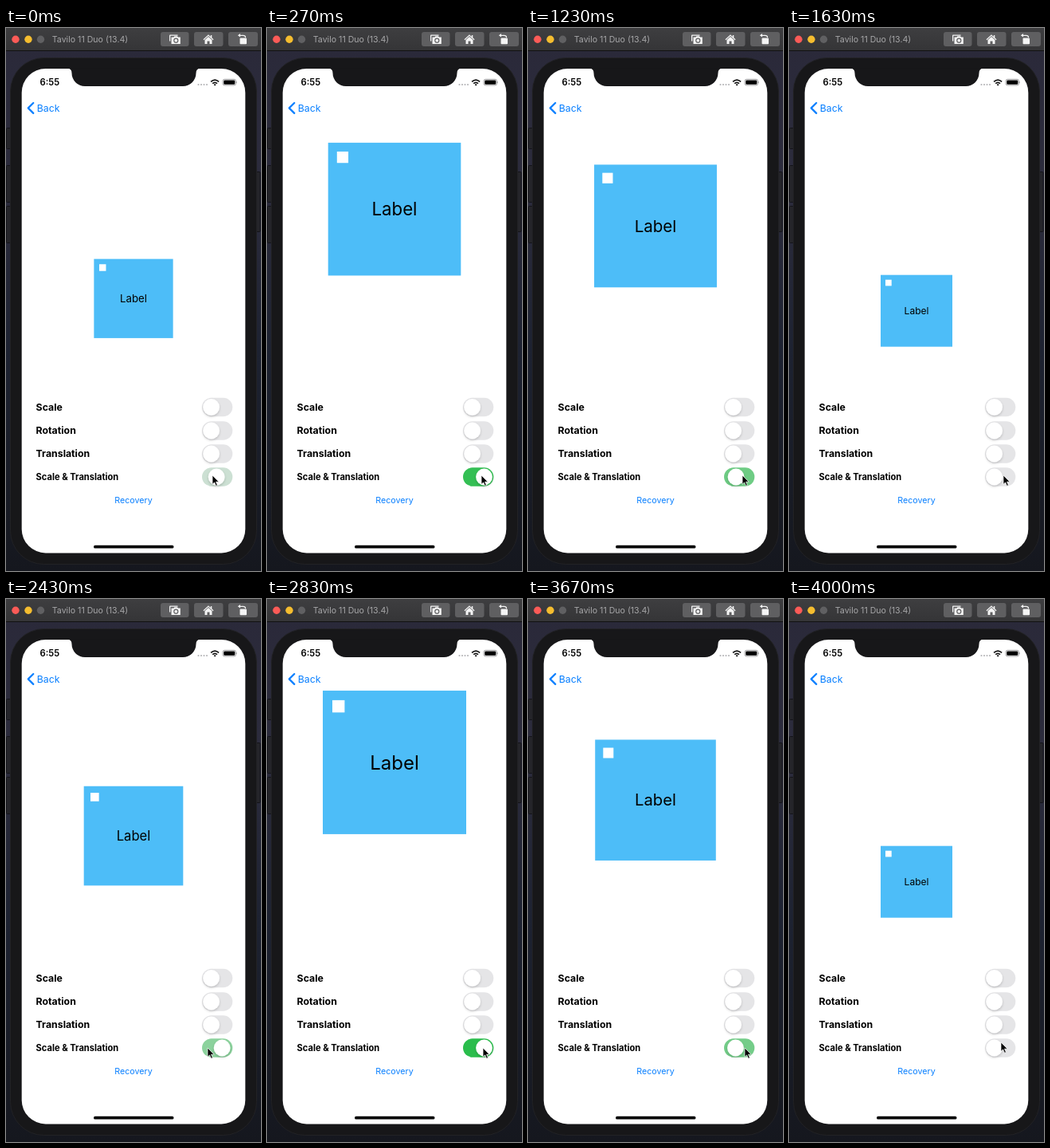
Animation, 320 px wide and 681 px high, one loop 4.03 s. Source, as an HTML page:

```html
<!DOCTYPE html>
<html lang="en">
<head>
<meta charset="utf-8">
<title>Transform demo</title>
<style>
  html, body { margin: 0; width: 100%; height: 100%; overflow: hidden; background: #15171f; }
  svg { display: block; width: 320px; height: 681px; font-family: Inter, Roboto, sans-serif; }
  .bold { font-weight: 700; font-size: 12.3px; }
  .mid { text-anchor: middle; }
  .blue { fill: #087fff; }
  .line { fill: none; stroke-linecap: round; stroke-linejoin: round; }
</style>
</head>
<body>
<svg viewBox="0 0 320 681">
  <defs>
    <linearGradient id="desk" x2="0" y2="1">
      <stop stop-color="#2a2939"/>
      <stop offset=".3" stop-color="#2c2c3d"/>
      <stop offset=".6" stop-color="#1d2231"/>
      <stop offset="1" stop-color="#15171e"/>
    </linearGradient>
    <linearGradient id="bar" x2="0" y2="1">
      <stop stop-color="#3e3e40"/>
      <stop offset="1" stop-color="#353537"/>
    </linearGradient>
    <filter id="shade" x="-50%" y="-50%" width="200%" height="200%">
      <feDropShadow dx="0" dy="1.5" stdDeviation="1.4" flood-opacity=".2"/>
    </filter>
  </defs>
  <rect width="320" height="681" fill="url(#desk)"/>

  <!-- window bar -->
  <rect width="320" height="28" fill="url(#bar)"/>
  <rect y="28" width="320" height="1" fill="#111"/>
  <circle cx="12" cy="14.3" r="4.7" fill="#fc5b57"/>
  <circle cx="28" cy="14.3" r="4.7" fill="#f5bd2f"/>
  <circle cx="43.5" cy="14.3" r="4.7" fill="#606062"/>
  <text x="57.800" y="18" font-size="10.600" fill="#a6a6a8">Tavilo 11 Duo (13.4)</text>
  <g fill="#5f5f61">
    <rect x="194" y="5" width="35.5" height="18" rx="3"/>
    <rect x="236" y="5" width="36.5" height="18" rx="3"/>
    <rect x="279" y="5" width="37" height="18" rx="3"/>
  </g>
  <g fill="#f4f4f4">
    <path d="M205 16.5V9.5q0-1 1-1h9.500v1.300h-9.200v6.700z"/>
    <path d="M207.500 11.500h2.900l1-1.300h3.600l1 1.300h2.800v8.500H207.500z"/>
    <path d="M247.500 14.300 254 8.300l2.800 2.600V9h1.500v3.300l2.200 2-.8.900-5.700-5.200-5.700 5.200z"/>
    <path d="M249.500 15 254 11l4.500 4v5h-3v-3.500h-3V20h-3z"/>
    <rect x="293.500" y="12.500" width="8.500" height="7.800" rx="1"/>
    <path d="M294 7v4.600l-3.200-2.300z"/>
  </g>
  <path class="line" d="M294 9.300h3.500q3 0 3 2.200" stroke="#f4f4f4" stroke-width="1.200"/>
  <circle cx="213.300" cy="15.700" r="2.500" fill="none" stroke="#5f5f61" stroke-width="1.200"/>

  <!-- phone -->
  <g fill="#25252a" stroke="#14141a">
    <rect x=".5" y="125.500" width="7" height="26" rx="1"/>
    <rect x=".5" y="172.500" width="7" height="46" rx="1"/>
    <rect x=".5" y="223.500" width="7" height="46" rx="1"/>
    <rect x="313" y="180.500" width="6" height="75" rx="1"/>
  </g>
  <rect x="5.500" y="37.500" width="309" height="635" rx="42" fill="#171719" stroke="#222225"/>
  <rect x="19.700" y="51" width="280.600" height="607.400" rx="30" fill="#fff"/>
  <path d="M77 50.500q5.500.500 5.500 6a16.500 16.500 0 0 0 16.500 16.500h123a16.500 16.500 0 0 0 16.500-16.500q0-5.500 5.500-6z" fill="#171719"/>

  <!-- status bar -->
  <text class="bold" x="42.500" y="72.300" style="font-size:11.3px;font-weight:600">6:55</text>
  <g fill="#b5b5b7">
    <circle cx="241.500" cy="71" r="1.100"/><circle cx="245" cy="71" r="1.100"/>
    <circle cx="248.500" cy="71" r="1.100"/><circle cx="252" cy="71" r="1.100"/>
  </g>
  <g class="line" stroke="#111" stroke-width="1.700" style="stroke-linecap:butt">
    <path d="M257.100 67.400q5-4.600 10 0M259.200 69.600q2.900-2.600 5.800 0"/>
  </g>
  <path d="M260.600 71q1.500-1.300 3 0l-1.500 1.600z"/>
  <rect x="272" y="64.300" width="16.500" height="7.600" rx="2.300" fill="none" stroke="#8b8b8d" stroke-width=".8"/>
  <rect x="273.200" y="65.500" width="14.100" height="5.200" rx="1.300"/>
  <path d="M289.300 66.800q1.500 1.300 0 2.600z" fill="#8b8b8d"/>

  <!-- screen content -->
  <path class="line" d="M34.300 94 27.800 100.400l6.500 6.500" stroke="#087fff" stroke-width="2.200"/>
  <text class="blue" x="38.800" y="104.900" font-size="12.300">Back</text>
  <g id="box">
    <rect x="-45" y="-45" width="90" height="90" fill="#4dbdf8"/>
    <rect x="-39" y="-39" width="7.700" height="7.700" fill="#fff"/>
    <text class="mid" y="4.300" font-size="12">Label</text>
  </g>
  <g id="rows"></g>
  <text class="blue mid" x="160" y="596" font-size="10.700">Recovery</text>
  <rect x="110" y="648.800" width="100.500" height="3.700" rx="1.850"/>
  <path id="cursor" d="M0 0V11.300l2.600-2.400 1.900 4.300 1.900-.8-1.900-4.200h3.600z"
    stroke="#fff" stroke-width=".7" stroke-linejoin="round"/>
</svg>
<script>
const $ = id => document.getElementById(id);
const LOOP = 4030, OFF = [229, 229, 231], ON = [42, 189, 76];

const rows = [['Scale', 475.5], ['Rotation', 505], ['Translation', 534], ['Scale &amp; Translation', 563, 11.1]];
$('rows').innerHTML = rows.map(([name, y, size = 12.3]) => `
  <text class="bold" x="37.600" y="${y + size * .36}" style="font-size:${size}px">${name}</text>
  <rect class="track" x="246" y="${y - 11.7}" width="38.300" height="23.400" rx="11.700" fill="rgb(${OFF})"/>
  <circle class="knob" cx="257.600" cy="${y}" r="10.400" fill="#fff" filter="url(#shade)"/>`).join('');
const track = [...document.querySelectorAll('.track')].pop();
const knob = [...document.querySelectorAll('.knob')].pop();

// [start time, switch state]
const flips = [[-103, 1], [1050, 0], [2218, 1], [3481, 0]];
// [time, x, y] of the pointer tip
const path = [[0, 259, 561], [250, 269, 561], [1650, 269, 561], [2150, 253, 563],
  [2430, 253, 563], [2700, 271, 563], [3670, 272, 563], [4000, 266, 556], [LOOP, 266, 556]];

const ease = x => (1 - Math.cos(Math.PI * x)) / 2;
const mix = (a, b, k) => a + (b - a) * k;

function draw(t) {
  const [start, on] = flips.findLast(f => f[0] <= t);
  const phase = ms => {
    const x = Math.min(1, (t - start) / ms);
    return on ? x : 1 - x;
  };
  const p = ease(phase(500)), tint = ease(phase(440));
  $('box').setAttribute('transform', `translate(160 ${mix(354.7, 204.9, p)}) scale(${1 + p})`);
  track.setAttribute('fill', `rgb(${OFF.map((c, i) => Math.round(mix(c, ON[i], tint)))})`);
  knob.setAttribute('cx', mix(257.6, 272.5, phase(235)));

  const i = path.findIndex(q => q[0] > t), a = path[i - 1], b = path[i];
  const k = ease((t - a[0]) / (b[0] - a[0]));
  $('cursor').setAttribute('transform', `translate(${mix(a[1], b[1], k)} ${mix(a[2], b[2], k)})`);
}

const begin = performance.now();
function tick() {
  draw((performance.now() - begin) % LOOP);
  requestAnimationFrame(tick);
}
tick();
</script>
</body>
</html>
```
